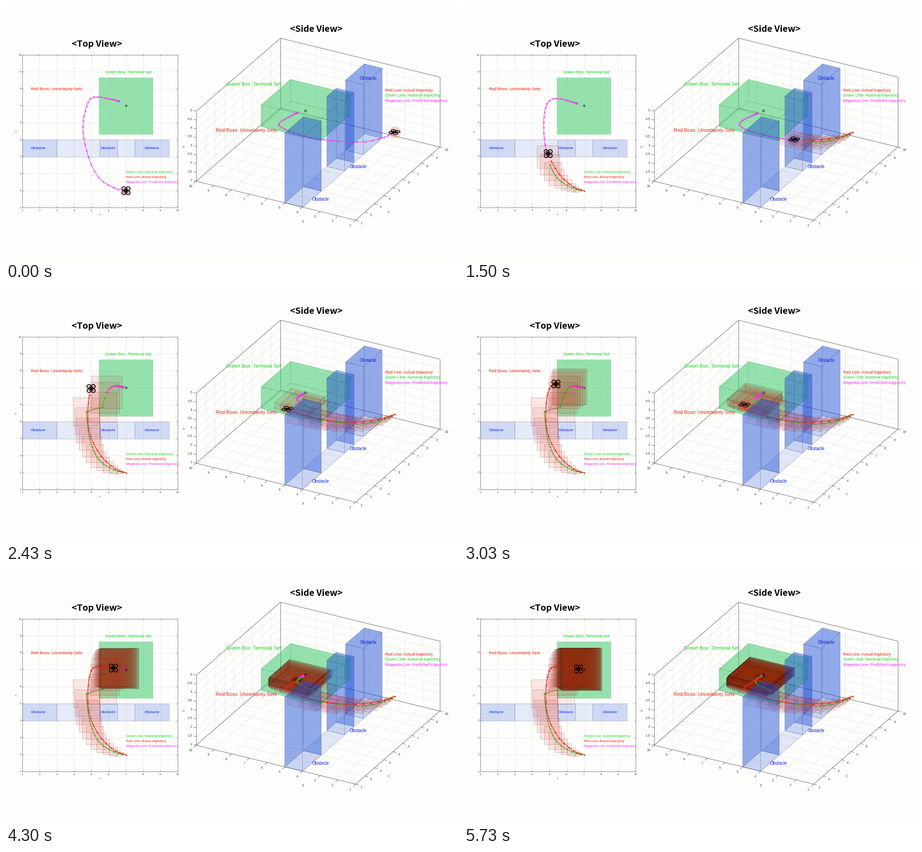
Recreate the animation shown at these times as a matplotlib script. Size 998x561 px, loop 5760 ms.

```python
import numpy as np
import matplotlib.pyplot as plt
from matplotlib.animation import FuncAnimation
from matplotlib.collections import LineCollection, PolyCollection

W, H, DPI = 998, 561, 100
STEPS, STEP_MS = 36, 160
REPLAN = 13  # step at which the nominal path jumps
PT = 72 / DPI

INK, GRID = "#3c3c40", "#e6e6de"
BLUE, GREEN = (0.09, 0.29, 0.84), (0.18, 0.78, 0.37)
RED_T, GREEN_T, BLUE_T, MAGENTA = "#ee2211", "#14d420", "#1122dd", "#f32ff0"

fig = plt.figure(figsize=(W / DPI, H / DPI), dpi=DPI, facecolor="#fdfdfc")
ax = fig.add_axes([0, 0, 1, 1])
ax.set(xlim=(0, W), ylim=(H, 0))
ax.axis("off")


def flat(x, y):
    """Top view: world units to pixels."""
    return np.stack([36 + 38.11 * (np.asarray(x) - 1),
                     445 - 37.44 * (np.asarray(y) - 1)], -1)


def world(p):
    return 1 + (p[:, 0] - 36) / 38.11, 1 + (445 - p[:, 1]) / 37.44


def proj(x, y, z):
    """Side view: orthographic projection to pixels."""
    x, y, z = np.broadcast_arrays(x, y, z)
    return np.stack([772 + 20.67 * (x - 1) - 39.11 * (y - 1),
                     473 - 17.94 * (x - 1) - 9.56 * (y - 1) - 38.6 * (z - 1)], -1)


def side(p):
    return proj(*world(p), 3)


def rect(x0, x1, y0, y1):
    return flat([x0, x1, x1, x0], [y0, y0, y1, y1])


def faces(x0, x1, y0, y1, z0, z1):
    """Projected far faces (bottom first) and near faces of a box."""
    xs, ys = [x0, x1, x1, x0], [y0, y0, y1, y1]
    level = lambda z: proj(xs, ys, z)
    wall_x = lambda x: proj(x, [y0, y1, y1, y0], [z0, z0, z1, z1])
    wall_y = lambda y: proj([x0, x1, x1, x0], y, [z0, z0, z1, z1])
    return ([level(z0), wall_x(x1), wall_y(y1)],
            [level(z1), wall_x(x0), wall_y(y0)])


def polys(verts, color, alpha, z, edge=(0.2, 0.25, 0.4, 0.35)):
    pc = PolyCollection(verts, facecolors=[(*color, alpha)], edgecolors=[edge],
                        linewidths=0.6 * PT, zorder=z)
    return ax.add_collection(pc)


def lines(segs, color, width, z):
    return ax.add_collection(LineCollection(segs, colors=color,
                                            linewidths=width * PT, zorder=z))


def text(x, y, s, px, color=INK, ha="center", **kw):
    kw.setdefault("family", "Liberation Sans")
    ax.text(x, y, s, fontsize=px * PT, color=color, ha=ha,
            va="center_baseline" if kw.get("weight") else "center",
            zorder=20, **kw)


def spline(p, n):
    """Catmull-Rom curve, n samples per segment."""
    p = np.asarray(p, float)
    q = np.vstack([2 * p[0] - p[1], p, 2 * p[-1] - p[-2]])
    t = np.arange(n)[:, None] / n
    out = []
    for a, b, c, d in zip(q, q[1:], q[2:], q[3:]):
        out.append(b + 0.5 * t * (c - a + t * (2 * a - 5 * b + 4 * c - d
                                               + t * (3 * (b - c) + d - a))))
    return np.vstack(out + [p[-1:]])


# ---- static scene -------------------------------------------------------
def draw_top_axes():
    n = np.arange(1, 11)
    lines([flat([v, v], [1, 10]) for v in n] + [flat([1, 10], [v, v]) for v in n],
          GRID, 0.8, 1)
    ticks = []
    for v in n:
        for a, b in ((1, 1.09), (10, 9.91)):
            ticks += [flat([v, v], [a, b]), flat([a, b], [v, v])]
        x, y = flat(v, v)
        text(x, 451, str(v), 6)
        text(34, y, str(v), 6, ha="right")
    box = rect(1, 10, 1, 10)
    lines(ticks + [np.vstack([box, box[:1]])], "#66666a", 0.8, 2)
    text(207, 460, "x", 6.5)
    text(22, 276, "y", 6.5, rotation=90)


def draw_side_axes():
    grid, ticks = [], []
    for v in range(1, 11):
        grid += [proj([v, v], [1, 10], 1), proj([1, 10], [v, v], 1),
                 proj([v, v], 10, [1, 5]), proj(10, [v, v], [1, 5])]
        px, py = proj(v, 1, 1), proj(1, v, 1)
        ticks += [[px, px + (7, 1.8)], [py, py + (-5.5, 4.8)]]
        text(px[0] + 11 + 2 * len(str(v)), px[1] + 7, str(v), 7.5)
        text(py[0] - 12, py[1] + 12, str(v), 7.5)
    for z in np.arange(1, 5.1, 0.5):
        grid += [proj([1, 10], 10, z), proj(10, [1, 10], z)]
        p = proj(1, 10, z)
        ticks.append([p, p + (-6, -1.5)])
        text(411, p[1] - 1.5, f"{z:g}", 7.5, ha="right")
    lines(grid, GRID, 0.8, 1)
    edges = [proj([1, 10, 10], [10, 10, 1], z) for z in (1, 5)]
    edges += [proj([1, 1, 10], [10, 1, 1], 1)]
    edges += [proj(x, y, [1, 5]) for x, y in ((1, 10), (10, 10), (10, 1))]
    lines(edges + ticks, "#55555c", 0.8, 2)
    text(656, 475, "y", 8)
    text(845, 455, "x", 8)
    text(393, 310, "z", 8, rotation=90)


def draw_obstacles():
    for a, b in ((3, 5.5), (6.5, 7.5)):
        polys([proj([a, b, b, a], [4, 4, 5, 5], 1)], BLUE, 0.12, 3)
        polys([rect(a, b, 4, 5)], BLUE, 0.10, 3)
    for a, b, z in ((7.5, 9.5, 4), (5.5, 6.5, 12), (1, 3, 14)):
        far, near = faces(a, b, 4, 5, 1, 5)
        polys(far[:1], BLUE, 0.03, z)
        polys(far[1:], BLUE, 0.32, z)
        polys(near, BLUE, 0.2, z)
        polys([rect(a, b, 4, 5)], BLUE, 0.20, 3)


def draw_terminal_set():
    span = (5.43, 8.56, 5.33, 8.67)
    edge = (0.2, 0.5, 0.3, 0.35)
    polys([rect(*span)], GREEN, 0.5, 4, edge)
    far, near = faces(*span, 2.4, 3.64)
    polys(far + near, GREEN, 0.29, 5, edge)
    for p, r in ((flat(7, 7), 3.6), (proj(7, 7, 3), 4.6)):
        ax.plot(*p, "o", mfc="none", mec="black", ms=r * PT, mew=0.9 * PT, zorder=16)


def draw_labels():
    for s, x, y in (("<Top View>", 201, 82), ("<Side View>", 685, 49)):
        text(x, y, s, 19.6, "black", family="Noto Sans CJK JP", weight="bold")
    text(219, 146, "Green Box: Terminal Set", 9.36, GREEN_T, "left")
    text(486, 173, "Green Box: Terminal Set", 11.1, GREEN_T, "left")
    text(55, 183.5, "Red Boxs: Uncertainty Sets", 9.32, RED_T, "left")
    text(463, 275, "Red Boxs: Uncertainty Sets", 11.05, RED_T, "left")
    green = ("Green Line: Nominal trajectory", GREEN_T)
    red = ("Red Line: Actual trajectory", RED_T)
    pink = ("Magenta Line: Predicted trajectory", MAGENTA)
    for i, (s, c) in enumerate((green, red, pink)):
        text(265, 367 + 11.2 * i, s, 7.52, c, "left")
    for i, (s, c) in enumerate((red, green, pink)):
        text(837, 186 + 11.6 * i, s, 8.95, c, "left")
    for x in (71, 225, 322):
        text(x, 314, "Obstacle", 8.35, BLUE_T)
    for x, y in ((694, 426.5), (777, 354.5), (799, 160)):
        text(x, y, "Obstacle", 9.65, BLUE_T)


# ---- trajectories in top view pixels; keys lie three steps apart ----------
START = [(265, 408), (237, 401), (204, 378)]
j = np.arange(STEPS - REPLAN)
settle = np.c_[265 - 52 * np.exp(-0.103 * j),
               220 + 43 * np.exp(-0.6 * j) - 2 * j * np.exp(-j / 6)]
nominal = np.vstack([spline(START + [(184.5, 333), (177, 273)], 3), settle])

j = np.arange(1, STEPS - 18)
actual = np.vstack([
    spline([(265, 408), (241, 399), (210, 371), (186, 326), (180, 273),
            (188, 222), (203, 212)], 3),
    np.c_[263 - 60 * np.exp(-0.105 * j), 219.5 - 7.5 * np.exp(-0.12 * j)]])

# the rest of the plan drifts from its first shape to that of step 9
plan_a = np.array([(182, 333), (169.5, 270), (182, 211), (203, 201), (250, 210)])
plan_b = np.array([(184.5, 333), (176, 273), (181, 221), (203, 204), (250, 215)])


def predicted(k):
    if k >= REPLAN:
        return nominal[k:]
    u = k / 9
    curve = spline(np.vstack([START, (1 - u) * plan_a + u * plan_b]), 30)
    head, tail = curve[10 * k:90:10], curve[max(90, 10 * k):]
    arc = np.r_[0, np.cumsum(np.hypot(*np.diff(tail, axis=0).T))]
    s = arc[-1] * (1 - (1 - np.linspace(0, 1, 25)) ** 1.8)
    return np.vstack([head, np.c_[np.interp(s, arc, tail[:, 0]),
                                  np.interp(s, arc, tail[:, 1])]])


# ---- uncertainty sets, growing step by step -------------------------------
k = np.arange(STEPS)
cx, cy = world(nominal)
grow = np.tanh(k / 15.5)
top_boxes, far_faces, near_faces = [], [], []
for x, y, g in zip(cx, cy, grow):
    span = (x - 1.183 * g, x + 1.183 * g, y - 1.28 * g, y + 1.28 * g)
    top_boxes.append(rect(*span))
    far, near = faces(*span, 3 - 0.22 * g, 3 + 0.22 * g)
    far_faces.append(far)
    near_faces.append(near)
dark = np.clip((k - 13) / 9, 0, 1)[:, None]
tints = (1 - dark) * (0.92, 0.24, 0.2) + dark * (0.56, 0.17, 0.05)
opacity = 0.055 + 0.025 * dark


class BoxLayer:
    """Boxes of the steps first..last, shown up to the current step."""

    def __init__(self, shapes, first, last, z, strength, edge):
        self.shapes, self.first, self.last = shapes, first, last
        self.pc = polys([], BLUE, 1, z, (0.25, 0.1, 0.1, edge))
        rgba = np.hstack([tints, strength * opacity])[first:last + 1]
        self.pc.set_facecolors(np.repeat(rgba, len(shapes[0]), axis=0))

    def show(self, k):
        shown = self.shapes[self.first:min(k, self.last) + 1]
        self.pc.set_verts([face for box in shown for face in box])


tops = [[b] for b in top_boxes]
early, last = (1, REPLAN - 1), (REPLAN, STEPS - 1)
layers = [BoxLayer(tops, 1, STEPS - 1, 6, 1, 0.08),
          BoxLayer(tops, 1, STEPS - 1, 9, 1, 0.34),
          BoxLayer(far_faces, *last, 8, 1.3, 0.16),
          BoxLayer(near_faces, *last, 11, 0.65, 0.25),
          BoxLayer(far_faces, *early, 12.4, 1, 0.12),
          BoxLayer(near_faces, *early, 13, 1, 0.18)]


def track(color, size, z, lw):
    return ax.plot([], [], color=color, lw=lw * PT, marker="x", ms=size * PT,
                   mew=0.9 * PT, zorder=z)[0]


tracks = [(track(c, s, 7, w), track(c, s, 12.7, w))
          for c, s, w in (("#12c81c", 3, 1.3), ("#f8200f", 3, 1.3),
                          (MAGENTA, 3.4, 1.1))]

# ---- drone ----------------------------------------------------------------
OFF, RAD = 0.124, 0.112
ang = np.linspace(0, 2 * np.pi, 25)
parts = [(sx * OFF + RAD * np.cos(ang), sy * OFF + RAD * np.sin(ang))
         for sx in (-1, 1) for sy in (-1, 1)]
parts += [(np.array([-OFF, OFF]), s * np.array([-OFF, OFF])) for s in (1, -1)]
drone_top = lines([], "black", 1.7, 18)
drone_side = lines([], "black", 1.6, 18)
halos = [ax.plot([], [], "o", color=(0.95, 0.2, 0.15, a), mec="none", ms=d * PT,
                 zorder=z)[0] for d, a, z in ((19, 0.2, 17), (26, 0.22, 10))]

draw_top_axes()
draw_side_axes()
draw_obstacles()
draw_terminal_set()
draw_labels()


def update(k):
    for layer in layers:
        layer.show(k)
    for (a, b), p in zip(tracks, (nominal[:k], actual[:k], predicted(k))):
        a.set_data(*p.T)
        b.set_data(*side(p).T)
    here = actual[k:k + 1]
    x, y = (v[0] for v in world(here))
    drone_top.set_segments([flat(x + dx, y + dy) for dx, dy in parts])
    drone_side.set_segments([proj(x + dx, y + dy, 3) for dx, dy in parts])
    # once past the obstacles it flies inside the stacked sets
    drone_side.set_zorder(18 if k < REPLAN else 10.5)
    halos[0].set_data(*here.T)
    halos[1].set_data(*side(here).T)
    return []


anim = FuncAnimation(fig, update, frames=STEPS, interval=STEP_MS,
                     init_func=lambda: update(0), repeat=True, repeat_delay=0,
                     blit=False)
plt.show()
```
